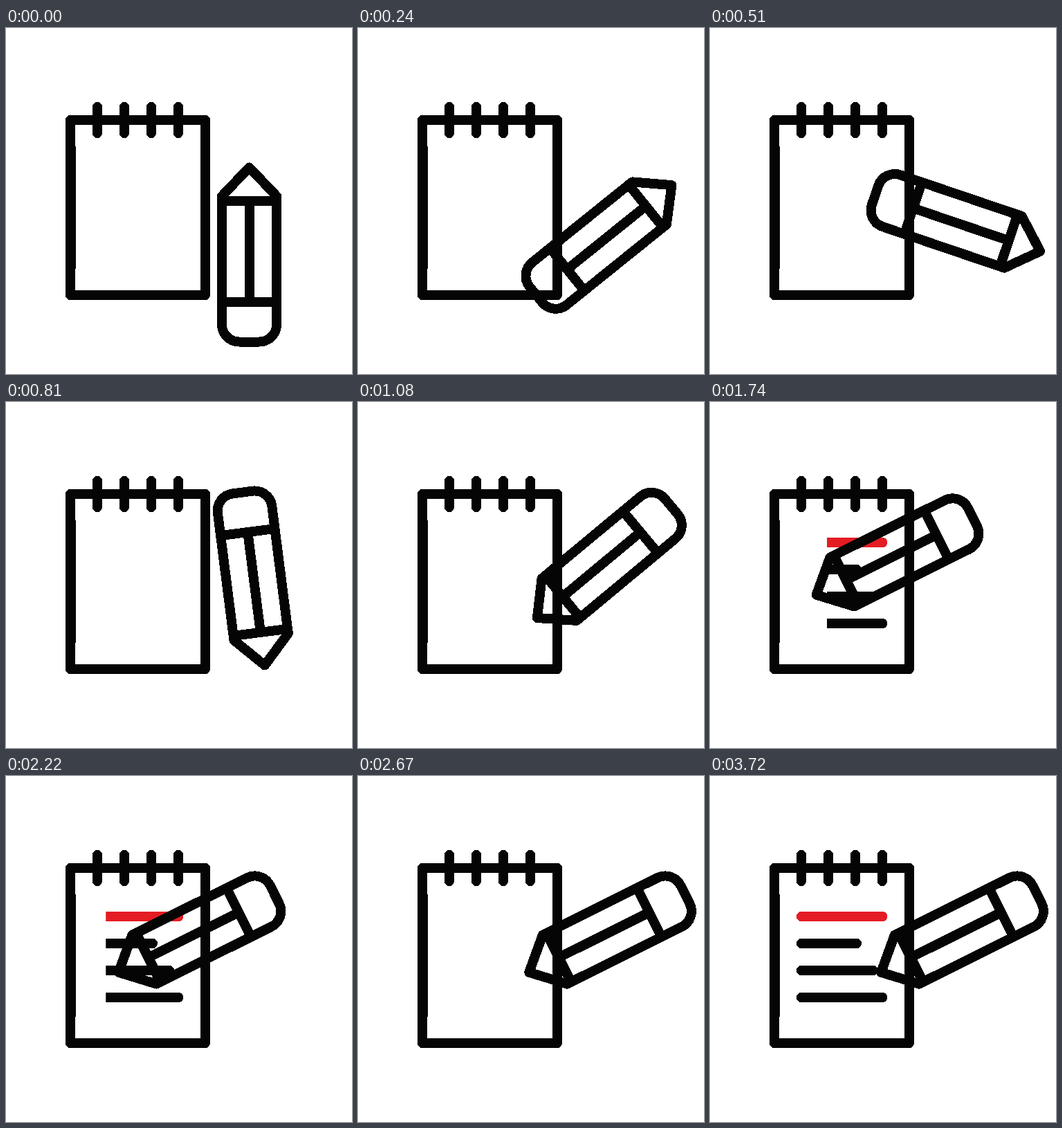
An HTML page for the animation above (3.75 s loop, 500x500 px).

```html
<!DOCTYPE html>
<html lang="en">
<head>
<meta charset="utf-8">
<title>Notepad and pencil</title>
<style>
  html, body { margin: 0; width: 100%; height: 100%; overflow: hidden; background: #fff; }
  svg { display: block; width: 100%; height: 100%; shape-rendering: crispEdges; }
  path { fill: none; stroke: #050505; stroke-width: 14; stroke-linecap: round; stroke-linejoin: round; }
  .red { stroke: #e41c23; }
  .edge { stroke-width: 2; stroke-linecap: butt; }
</style>
</head>
<body>
<svg viewBox="0 0 500 500">
  <clipPath id="wipe"><rect id="mask" x="260" y="190" width="200" height="145"/></clipPath>
  <path d="M93 133H288V386H93Z"/>
  <path class="edge" d="M100 171V348"/>
  <path d="M132 114v38M171 114v38M210 114v38M249 114v38"/>
  <g clip-path="url(#wipe)">
    <path class="red" d="M132 203H249.5"/>
    <path d="M132 242H212M132 281H236M132 320H249.5"/>
  </g>
  <g id="pencil">
    <path d="M0 -126L39.5 -84.5V101A25 25 0 0 1 14.5 126H-14.5A25 25 0 0 1 -39.5 101V-84.5Z"/>
    <path d="M-39.5 -78H39.5M0 -78V68M-39.5 68H39.5"/>
  </g>
</svg>
<script>
const LOOP = 3750, STEP = 30;
const pencil = document.getElementById('pencil');
const mask = document.getElementById('mask');

// Progress from 0 to 1 between two times.
const ramp = (t, from, to) => Math.min(1, Math.max(0, (t - from) / (to - from)));
const arc = p => Math.sin(Math.PI * p);

function draw(ms) {
  const t = Math.floor((ms % LOOP) / STEP) * STEP;

  // The pencil spins up beside the pad, writes to the left, then pulls back.
  const spin = ramp(t, 0, 1142);
  const write = ramp(t, 1116, 1986);
  const back = ramp(t, 1986, 2670);
  const x = 351.5 + 3.7 * spin + 4.8 * arc(spin) - 123.7 * write + 128.5 * back;
  const y = 327.5 - 101.5 * spin + 1.5 * write - 6 * arc(write);
  pencil.setAttribute('transform', `translate(${x} ${y}) rotate(${243.5 * spin})`);

  // The lines are wiped in, out and in again.
  const shown = ramp(t, 1090, 2055) - ramp(t, 2146, 2665) + ramp(t, 2765, 3330);
  mask.setAttribute('x', 260 - 135 * shown);
}

const start = performance.now();
function tick() {
  draw(performance.now() - start);
  requestAnimationFrame(tick);
}
tick();
</script>
</body>
</html>
```
